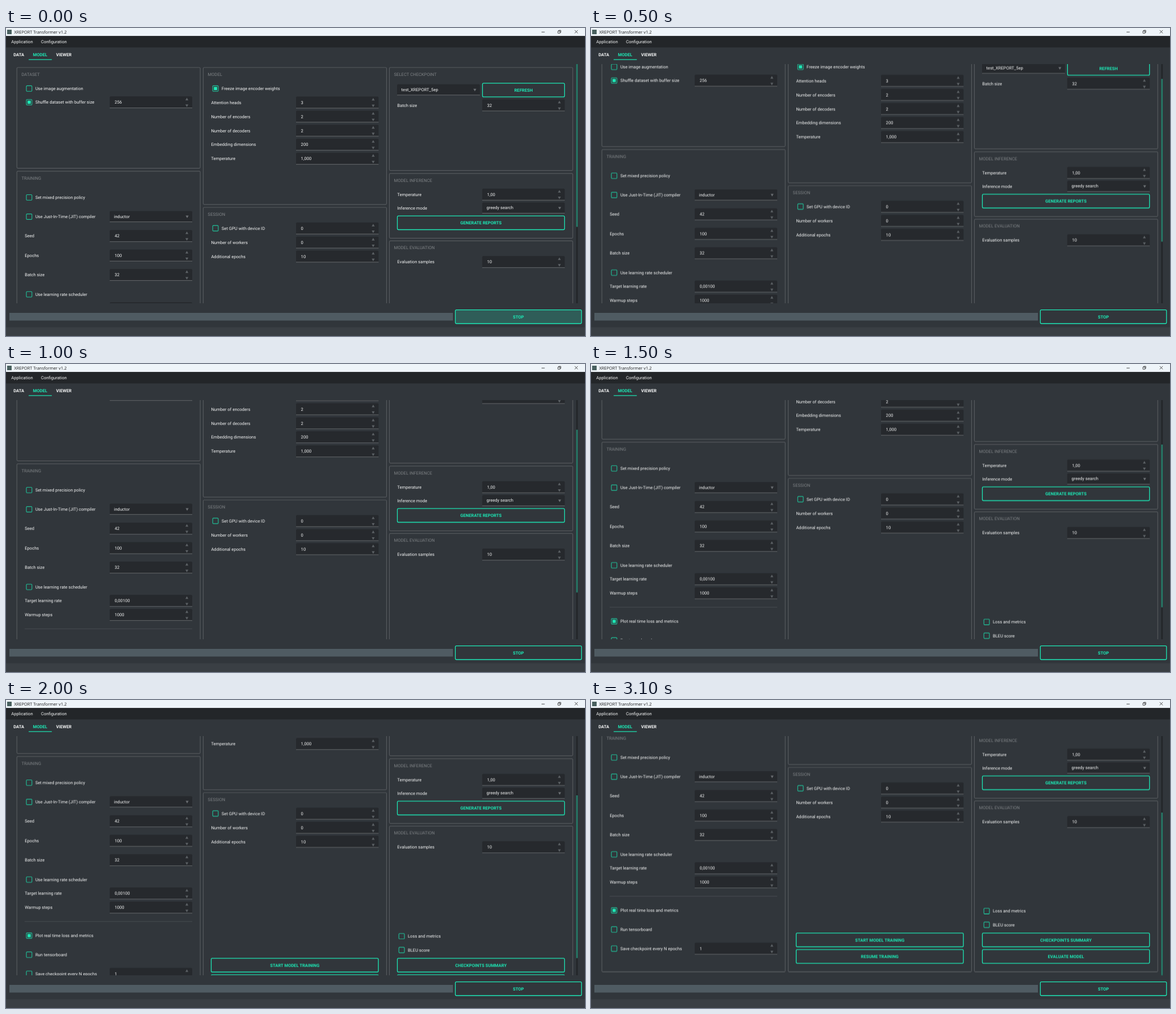
Animation, 1026 px wide and 546 px high, one loop 3500 ms. Source, as an HTML page:

```html
<!DOCTYPE html>
<html lang="en">
<head>
<meta charset="utf-8">
<title>XREPORT Transformer</title>
<style>
  html, body { margin: 0; width: 100%; height: 100%; overflow: hidden; background: #31363b; }
  svg { display: block; }
  text { font: 7.63px Roboto, sans-serif; fill: #f4f5f5; text-rendering: geometricPrecision; white-space: pre; }
  .bold { font-weight: 700; }
  .teal { fill: #1de9b6; }
  .mid { text-anchor: middle; }
  .heading { font-size: 7.7px; fill: #7f8386; }
  .caption { font: 7.45px "Open Sans", "Noto Sans", sans-serif; fill: #1b1b1b; }
  .box { fill: none; stroke: #565a5e; stroke-width: 1.2; }
  .button { fill: none; stroke: #1de9b6; stroke-width: 1.3; }
  .check { fill: none; stroke: #20c39b; stroke-width: 1.1; }
  .field { fill: #26292d; }
  .edge { fill: #64686b; }
  .arrow { fill: #5d6266; }
  .drop { fill: #6d7175; }
  .glyph { fill: none; stroke: #222; stroke-width: .8; }
</style>
</head>
<body>
<svg width="1026" height="546" viewBox="0 0 1026 546">
  <defs><clipPath id="view"><rect y="64" width="1026" height="424"/></clipPath></defs>
  <g id="frame"></g>
  <g clip-path="url(#view)"><g id="content"></g></g>
  <rect x="1010.4" y="64" width="2.8" height="424" fill="#232629"/>
  <rect id="thumb" x="1010.4" y="64" width="2.8" height="288.5" fill="#277b69"/>
</svg>
<script>
const LOOP = 3500, STEP = 500, THUMB_RATIO = 0.683;
const SCROLL = [0, 38.45, 76.9, 115.35, 153.8, 198.5];

const rect = (x, y, w, h, attrs) => `<rect x="${x}" y="${y}" width="${w}" height="${h}" ${attrs}/>`;
const text = (x, y, s, cls = "") => `<text x="${x}" y="${y + 2.7}" class="${cls}">${s}</text>`;
const tri = (x, y, dir, cls) =>
  `<path class="${cls}" d="M${x - 2.6} ${y - dir * 2.2}h5.2l-2.6 ${dir * 4.6}z"/>`;

// Widgets are placed by their vertical centre, in the coordinates of the first column.
const group = (title, top, bottom) =>
  rect(19.3, top, 324.9, bottom - top, 'rx="1.8" class="box"') + text(27.4, top + 12, title, "heading");
const label = (y, s) => text(33.2, y, s);
const check = (y, s, on, x = 41) =>
  rect(x - 4.9, y - 4.9, 9.8, 9.8, 'rx="1.2" class="check"') +
  (on ? rect(x - 2.9, y - 2.9, 5.8, 5.8, 'class="teal"') : "") + text(x + 10.9, y, s);
const field = (x, w, top, bottom) =>
  rect(x, top, w, bottom - top, 'rx="2" class="field"') + rect(x, bottom - 1.1, w, 1.1, 'class="edge"');
const spin = (y, s) => field(183.8, 146.2, y - 10.4, y + 10.6) + text(192.4, y, s) +
  tri(320.5, y - 5.6, -1, "arrow") + tri(320.5, y + 6, 1, "arrow");
const combo = (y, s, x = 183.8, w = 146.2) => field(x, w, y - 9.6, y + 10) +
  text(x + 7.5, y - .3, s) + tri(x + w - 9, y + .5, 1, "drop");
const button = (y, s, x = 33.4, w = 296.2, attrs = "") =>
  rect(x, y - 12.2, w, 24.4, `rx="2" class="button" ${attrs}`) + text(x + w / 2, y, s, "bold teal mid");
const row = (y, name, value) => label(y, name) + spin(y, value);
const column = (x, ...parts) => `<g transform="translate(${x})">${parts.join("")}</g>`;

document.getElementById("frame").innerHTML = [
  rect(0, 0, 1026, 14.2, 'fill="#eef4f9"'),
  rect(2, 3, 8, 8, 'fill="#49615f"'),
  text(14.4, 7.2, "XREPORT Transformer v1.2", "caption"),
  '<path class="glyph" d="M949 7.2h5.6M1007.8 3.9l5.4 5.4m0-5.4l-5.4 5.4"/>',
  '<path class="glyph" d="M978 5.4h3.8v3.8h-3.8zM979.3 5.2v-1.1h3.8v3.8h-1.1"/>',
  rect(0, 14.2, 1026, 20.2, 'fill="#232629"'),
  text(9.3, 24.6, "Application"), text(62, 24.6, "Configuration"),
  text(13.2, 47.7, "DATA", "bold"), text(47.8, 47.7, "MODEL", "bold teal"), text(88.8, 47.7, "VIEWER", "bold"),
  rect(40.2, 55.4, 41, 1.2, 'class="teal"'),
  rect(6, 505, 786, 13.6, 'fill="#4f5b62"'),
  button(511.8, "STOP", 796.3, 223.5, 'id="stop"'),
  rect(0, 530.5, 1026, 15.5, 'fill="#3a3f44"')
].join("");

document.getElementById("content").innerHTML =
  column(0,
    group("DATASET", 70, 248.6),
    check(107.3, "Use image augmentation"),
    check(131.6, "Shuffle dataset with buffer size", true), spin(131.6, "256"),
    group("TRAINING", 253.8, 680.2),
    check(300.4, "Set mixed precision policy"),
    check(334.5, "Use Just-In-Time (JIT) compiler"), combo(334.2, "inductor"),
    row(368.7, "Seed", "42"), row(403.2, "Epochs", "100"), row(437.6, "Batch size", "32"),
    check(472.1, "Use learning rate scheduler"),
    row(496.7, "Target learning rate", "0,00100"), row(521.6, "Warmup steps", "1000"),
    rect(33, 545.9, 297, .7, 'fill="#54595d"'),
    check(571.5, "Plot real time loss and metrics", true),
    check(605.3, "Run tensorboard"),
    check(639.2, "Save checkpoint every N epochs"), spin(639.2, "1")) +
  column(330.2,
    group("MODEL", 70, 312.8),
    check(107.3, "Freeze image encoder weights", true),
    row(132, "Attention heads", "3"), row(156.9, "Number of encoders", "2"),
    row(181.8, "Number of decoders", "2"), row(206.7, "Embedding dimensions", "200"),
    row(231.6, "Temperature", "1,000"),
    group("SESSION", 318, 680.2),
    check(355, "Set GPU with device ID"), spin(355.2, "0"),
    row(380.1, "Number of workers", "0"), row(405, "Additional epochs", "10"),
    button(623.8, "START MODEL TRAINING"), button(653.1, "RESUME TRAINING")) +
  column(660.1,
    group("SELECT CHECKPOINT", 70, 252.6),
    combo(109.4, "test_XREPORT_5ep", 33, 146.7), button(110, "REFRESH", 184.3, 145.3),
    row(137, "Batch size", "32"),
    group("MODEL INFERENCE", 257.8, 372.6),
    row(295.2, "Temperature", "1,00"),
    label(319.1, "Inference mode"), combo(318.9, "greedy search"),
    button(345.3, "GENERATE REPORTS"),
    group("MODEL EVALUATION", 377.4, 680.2),
    row(414.7, "Evaluation samples", "10"),
    check(572.6, "Loss and metrics"), check(597, "BLEU score"),
    button(623.8, "CHECKPOINTS SUMMARY"), button(653.1, "EVALUATE MODEL"));

// Each state holds until the next one; the last lasts to the end of the loop.
function play(id, states) {
  const frames = states.map((state, i) => ({ ...state, offset: i * STEP / LOOP, easing: "step-end" }));
  frames.push({ ...states[states.length - 1], offset: 1 });
  document.getElementById(id).animate(frames, { duration: LOOP, iterations: Infinity });
}
play("content", SCROLL.map(y => ({ transform: `translateY(${-y}px)` })));
play("thumb", SCROLL.map(y => ({ transform: `translateY(${y * THUMB_RATIO}px)` })));
play("stop", ["#2f5d58", "#31363b"].map(fill => ({ fill })));
</script>
</body>
</html>
```
